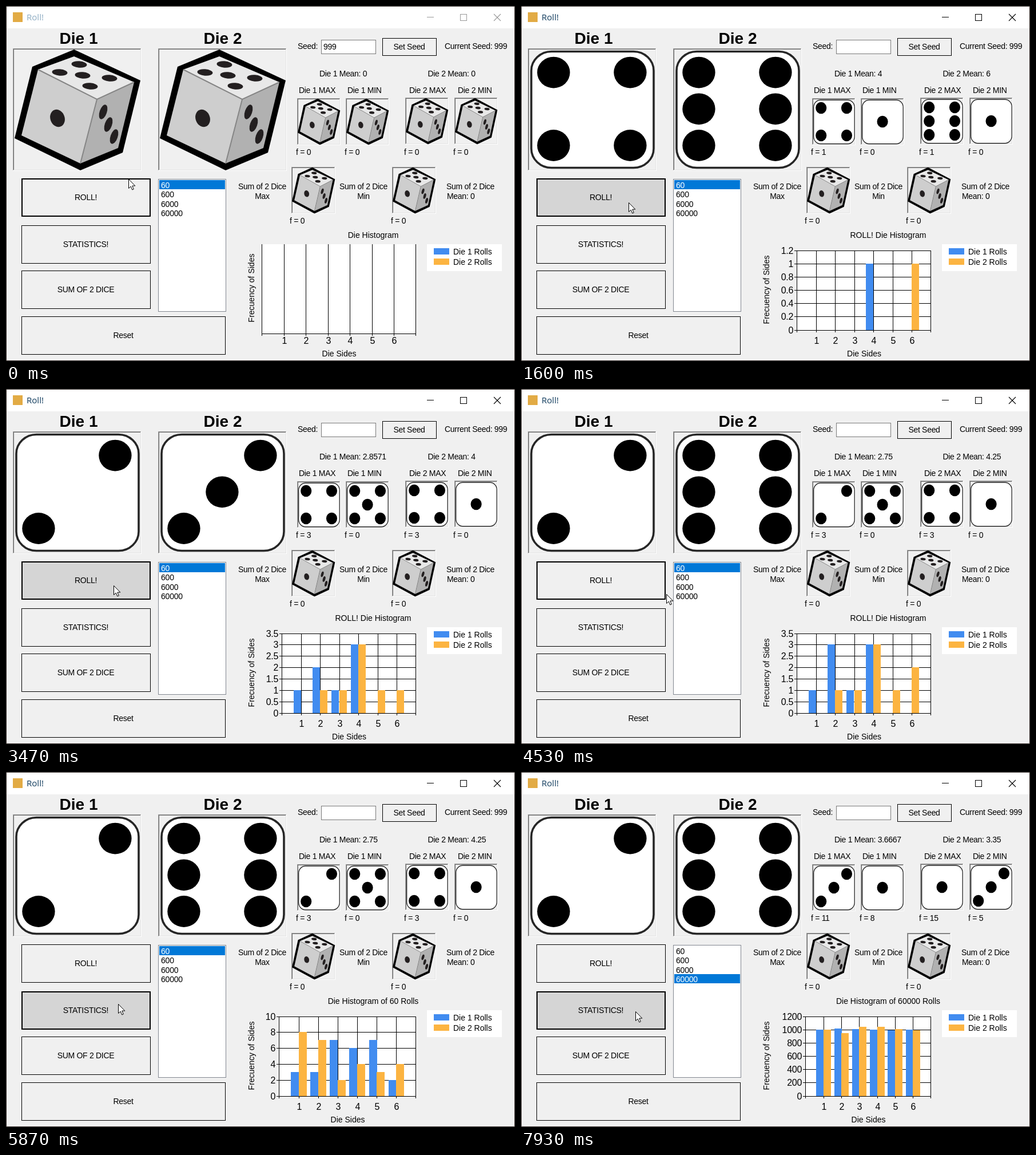
These frames come from a looping animation (890x620 px, 8 s). An HTML page with a canvas:

```html
<!DOCTYPE html>
<html lang="en">
<head>
<meta charset="utf-8">
<title>Roll!</title>
<style>
html, body { margin: 0; width: 100%; height: 100%; overflow: hidden; background: #f0f0f0; }
canvas { display: block; }
</style>
</head>
<body>
<canvas id="stage" width="890" height="620"></canvas>
<script>
const ctx = document.getElementById('stage').getContext('2d');
const LOOP = 8000, BLUE = '#418cf0', ORANGE = '#fcb441';
const FORM = '"Liberation Sans", Arial, sans-serif';

// Event times in ms
const ACTIVATE = 130, FIRST_ROLL = 1440, ROLL_GAP = 310;
const STATS_START = 5340, STATS_MID = 5870, STATS_END = 6480;
const PICK_60000 = 7450, STATS_PRESS = 7870, STATS_BIG = 7930;

const rolls = [[4, 6], [1, 5], [2, 4], [4, 4], [3, 4], [4, 2], [2, 3], [2, 6]];
const midRun = [[3, 3, 7, 6, 7, 2], [8, 7, 2, 4, 3, 4]];
const fullRun = [[8, 9, 11, 10, 11, 11], [15, 10, 5, 11, 7, 12]];
const bigRun = [[1000, 1018, 1008, 1000, 990, 1000], [1000, 943, 1038, 1038, 1004, 990]];

const cursorPath = [
  [0, 214, 302], [500, 214, 306], [1300, 188, 343], [3700, 188, 343], [4400, 246, 351],
  [4530, 254, 358], [4900, 262, 384], [5180, 256, 402], [5330, 205, 410], [5500, 196, 405],
  [6000, 196, 405], [6350, 180, 410], [6870, 225, 402], [7000, 228, 400], [7350, 292, 361],
  [7560, 290, 361], [7840, 200, 418], [8000, 200, 418]
];

function rect(x, y, w, h, color) {
  ctx.fillStyle = color;
  ctx.fillRect(x, y, w, h);
}

function text(str, x, y, { align = 'left', size = 14, color = '#000', spacing = -0.3, weight = '', family = FORM } = {}) {
  ctx.font = `${weight} ${size}px ${family}`;
  ctx.letterSpacing = spacing + 'px';
  ctx.textAlign = align;
  ctx.fillStyle = color;
  ctx.fillText(str, x, y);
}

function ellipse(x, y, rx, ry, angle = 0) {
  ctx.beginPath();
  ctx.ellipse(x, y, rx, ry, angle, 0, 7);
  ctx.fill();
}

function polygon(points, color) {
  ctx.beginPath();
  points.forEach(([x, y]) => ctx.lineTo(x, y));
  ctx.closePath();
  ctx.fillStyle = color;
  ctx.fill();
}

function strokeLine(points, color, width) {
  ctx.beginPath();
  points.forEach(([x, y]) => ctx.lineTo(x, y));
  ctx.strokeStyle = color;
  ctx.lineWidth = width;
  ctx.stroke();
}

function box(x, y, w, h, fill, border, width = 1) {
  rect(x, y, w, h, border);
  rect(x + width, y + width, w - 2 * width, h - 2 * width, fill);
}

function cube() {
  const mid = [147, 89], left = [44, 37], right = [212, 59], bottom = [118, 201];
  polygon([[107, 2], [223, 56], [192, 182], [118, 213], [3, 157], [34, 32]], '#000');
  polygon([[107, 14], right, mid, left], '#e8e8e8');
  polygon([left, mid, bottom, [15, 152]], '#cecece');
  polygon([mid, right, [184, 174], bottom], '#b1b1b1');
  strokeLine([left, mid, right], '#858585', 2);
  strokeLine([mid, bottom], '#858585', 2);
  ctx.fillStyle = '#231f20';
  [[116, 28], [82, 42], [122, 47], [169, 52], [135, 66]].forEach(([x, y]) => ellipse(x, y, 13.5, 5.7, 0.08));
  ellipse(78, 122, 12.5, 15.5, -0.35);
  [[158, 111], [167, 133], [177, 154]].forEach(([x, y]) => ellipse(x, y, 6.3, 13.2, 0.33));
}

function face(n, lineWidth) {
  ctx.beginPath();
  ctx.roundRect(0, 0, 1, 1, 0.165);
  ctx.fillStyle = '#fff';
  ctx.fill();
  ctx.strokeStyle = '#262626';
  ctx.lineWidth = lineWidth;
  ctx.stroke();
  const pips = [];
  if (n % 2) pips.push([0, 0]);
  if (n > 1) pips.push([1, -1], [-1, 1]);
  if (n > 3) pips.push([-1, -1], [1, 1]);
  if (n === 6) pips.push([-1, 0], [1, 0]);
  ctx.fillStyle = '#000';
  pips.forEach(([x, y]) => ellipse(0.495 + x * 0.313, 0.494 + y * 0.314, 0.134, 0.135));
}

// A sunken picture box; without a value it shows the cube
function picture(x, y, w, h, value) {
  rect(x, y, w, h, '#fff');
  rect(x, y, w - 1, h - 1, '#a0a0a0');
  rect(x + 1, y + 1, w - 2, h - 2, '#e3e3e3');
  rect(x + 1, y + 1, w - 3, h - 3, '#696969');
  rect(x + 2, y + 2, w - 4, h - 4, '#f0f0f0');
  ctx.save();
  if (value) {
    const large = w > 100, fw = large ? 214 : 71.5, fh = large ? 203 : 76.5;
    ctx.translate(x + (large ? 6 : 2.7), y + (large ? 5.5 : 3.2));
    ctx.scale(fw, fh);
    face(value, (large ? 3.6 : 1.3) / fw);
  } else {
    ctx.translate(x, y);
    ctx.scale(w / 225, h / 214);
    cube();
  }
  ctx.restore();
}

const buttons = [
  ['ROLL!', 27, 301, 226, 67],
  ['STATISTICS!', 27, 383, 226, 67],
  ['SUM OF 2 DICE', 27, 462, 226, 67],
  ['Reset', 27, 542, 357, 67],
  ['Set Seed', 658, 56, 95, 31]
];

function button([label, x, y, w, h], focused, [cx, cy], active) {
  const hovered = active && cx >= x && cx < x + w && cy >= y && cy < y + h;
  box(x, y, w, h, hovered ? '#d5d5d5' : '#f0f0f0', '#000', focused ? 2 : 1);
  text(label, x + w / 2 - 0.5, Math.floor(y + h / 2) + 5, { align: 'center' });
}

function cursorAt(t) {
  const i = cursorPath.findIndex(k => k[0] > t);
  const [t0, x0, y0] = cursorPath[i - 1], [t1, x1, y1] = cursorPath[i];
  let p = (t - t0) / (t1 - t0);
  p = p * p * (3 - 2 * p);
  return [Math.round(x0 + (x1 - x0) * p), Math.round(y0 + (y1 - y0) * p)];
}

function drawCursor(x, y) {
  ctx.save();
  ctx.translate(x + 0.5, y + 0.5);
  const arrow = [[0, 0], [0, 16], [3.7, 12.6], [6.3, 18.5], [8.8, 17.4], [6.3, 11.6], [11.3, 11.6], [0, 0]];
  polygon(arrow, '#fff');
  strokeLine(arrow, '#000', 1);
  ctx.restore();
}

function axisStep(max) {
  const raw = max / 5, power = 10 ** Math.floor(Math.log10(raw) + 1e-9), m = raw / power;
  return power * (m < 1.3 ? 1 : m < 2.5 ? 2 : m <= 7 ? 5 : 10);
}

function chart(counts, title) {
  const options = { align: 'center', spacing: 0 };
  const max = Math.max(...counts.flat());
  let left = 447, top = 416, bottom = 572, step, steps = 0;
  const right = 716;
  const tick = i => String(+(i * step).toFixed(2));
  if (max) {
    step = axisStep(max);
    steps = Math.floor(max / step + 1e-6) + 1;
    const widest = Array.from({ length: steps + 1 }, (_, i) => tick(i)).sort((a, b) => b.length - a.length)[0];
    left = 457 + 10 * widest.replace('.', '').length + (widest.includes('.') ? 5 : 0);
    top = 427;
    bottom = 566;
  }
  const unit = (right - left) / 7;
  rect(left, top, right - left, bottom - top, '#fff');
  for (let i = 0; i <= 7; i++) {
    const x = Math.ceil(left + unit * i - 1e-6);
    rect(x, top, 1, bottom - top + 4, '#000');
    if (i % 7) text(i, x + 1, 590, { ...options, size: 16 });
  }
  for (let i = 0; i <= steps && max; i++) {
    const y = Math.floor(bottom - (bottom - top) * i / steps);
    rect(left - 4, y, right - left + 5, 1, '#000');
    text(tick(i), left - 6, y + 6, { align: 'right', size: 16 });
  }
  counts.forEach((sides, die) => sides.forEach((n, i) => {
    if (!n) return;
    const x = Math.ceil(left + unit * (i + 1 - 0.4 * (1 - die)));
    const y = Math.floor(bottom - (bottom - top) * n / (steps * step));
    rect(x, y, Math.round(unit * 0.4), bottom - y, die ? ORANGE : BLUE);
  }));
  rect(left, bottom, right - left, 1, '#000');

  text(title, 642, 405, options);
  text('Die Sides', (left + right) / 2 + 1, 612, options);
  ctx.save();
  ctx.translate(434, max ? 495.5 : 492.5);
  ctx.rotate(-Math.PI / 2);
  text('Frecuency of Sides', 0, 0, options);
  ctx.restore();

  rect(736, 416, 131, 47, '#fff');
  [BLUE, ORANGE].forEach((color, i) => {
    rect(748, 423 + 18 * i, 27, 11, color);
    text(`Die ${i + 1} Rolls`, 782, 434 + 18 * i, { spacing: 0 });
  });
}

function tally(list) {
  return [0, 1].map(die => [1, 2, 3, 4, 5, 6].map(side => list.filter(r => r[die] === side).length));
}

function statsRun(t) {
  const lerp = (a, b, p) => a.map((die, d) => die.map((n, i) => Math.round(n + (b[d][i] - n) * p)));
  const zero = midRun.map(die => die.map(() => 0));
  return t < STATS_MID
    ? lerp(zero, midRun, (t - STATS_START) / (STATS_MID - STATS_START))
    : lerp(midRun, fullRun, Math.min(1, (t - STATS_MID) / (STATS_END - STATS_MID)));
}

function titleBar(active) {
  rect(1, 1, 888, 38, '#fff');
  rect(12, 11, 17, 17, '#e2ab45');
  text('Roll!', 36, 25, {
    size: 15, spacing: 0, color: active ? '#0f3a5c' : '#8cabc2', family: '"Open Sans", sans-serif'
  });
  const color = active ? '#000' : '#999';
  rect(736, 19, 12, 1, color);
  box(794, 14, 12, 12, '#fff', color);
  strokeLine([[853, 14], [865, 26]], color, 1.1);
  strokeLine([[865, 14], [853, 26]], color, 1.1);
}

function draw(t) {
  const active = t >= ACTIVATE, cursor = cursorAt(t);
  const rolled = Math.max(0, Math.min(rolls.length, Math.floor((t - FIRST_ROLL) / ROLL_GAP) + 1));
  const current = rolls[rolled - 1] || [];
  const rollCounts = tally(rolls.slice(0, rolled));
  const shown = t >= STATS_END ? fullRun : rollCounts;

  box(0, 0, 890, 620, '#f0f0f0', '#2b2320');
  titleBar(active);

  [0, 1].forEach(die => {
    text(`Die ${die + 1}`, [127, 379][die], 66, { size: 28, weight: 'bold', align: 'center', spacing: 0 });
    picture(12 + 254 * die, 74, 225, 214, current[die]);

    const counts = shown[die], total = counts.reduce((a, b) => a + b, 0);
    const sum = counts.reduce((a, n, i) => a + n * (i + 1), 0);
    text(`Die ${die + 1} Mean: ${total ? +(sum / total).toFixed(4) : 0}`, [548, 737.5][die], 122.5);
    ['MAX', 'MIN'].forEach((kind, k) => {
      const x = [[509, 594], [698, 784]][die][k];
      const n = Math[kind.toLowerCase()](...counts);
      text(`Die ${die + 1} ${kind}`, [[512, 597], [705, 790]][die][k], 152);
      picture(x, 161 - die, 76, 82, total && counts.indexOf(n) + 1);
      text(`f = ${n}`, x - 2, 260);
    });
  });

  text('Seed:', 510, 75);
  box(551, 59, 96, 25, '#fff', '#7a7a7a');
  if (!active) text('999', 555, 76);
  text('Current Seed: 999', 767, 75);

  ['Max', 'Min'].forEach((kind, i) => {
    const x = 448 + 177 * i;
    text('Sum of 2 Dice', x, 320, { align: 'center' });
    text(kind, x, 337, { align: 'center' });
    picture(499 + 176 * i, 281, 77, 82);
    text('f = 0', 496 + 177 * i, 380);
  });
  text('Sum of 2 Dice', 770, 320);
  text('Mean: 0', 771, 337);

  box(266, 302, 119, 232, '#fff', '#828790');
  const selected = t < PICK_60000 ? 0 : 3;
  ['60', '600', '6000', '60000'].forEach((item, i) => {
    const y = 304 + Math.round(16.33 * i);
    if (i === selected) rect(268, y, 115, 16, '#0078d7');
    text(item, 271, y + 13.5, { color: i === selected ? '#fff' : '#000', spacing: -0.2 });
  });

  const focus = t < STATS_START ? 0 : t < PICK_60000 || t >= STATS_PRESS ? 1 : -1;
  buttons.forEach((b, i) => button(b, i === focus, cursor, active));

  if (t >= STATS_BIG) chart(bigRun, 'Die Histogram of 60000 Rolls');
  else if (t >= STATS_START) chart(statsRun(t), 'Die Histogram of 60 Rolls');
  else chart(rollCounts, rolled ? 'ROLL! Die Histogram' : 'Die Histogram');

  drawCursor(...cursor);
}

function tick() {
  draw(performance.now() % LOOP);
  requestAnimationFrame(tick);
}
tick();
</script>
</body>
</html>
```
